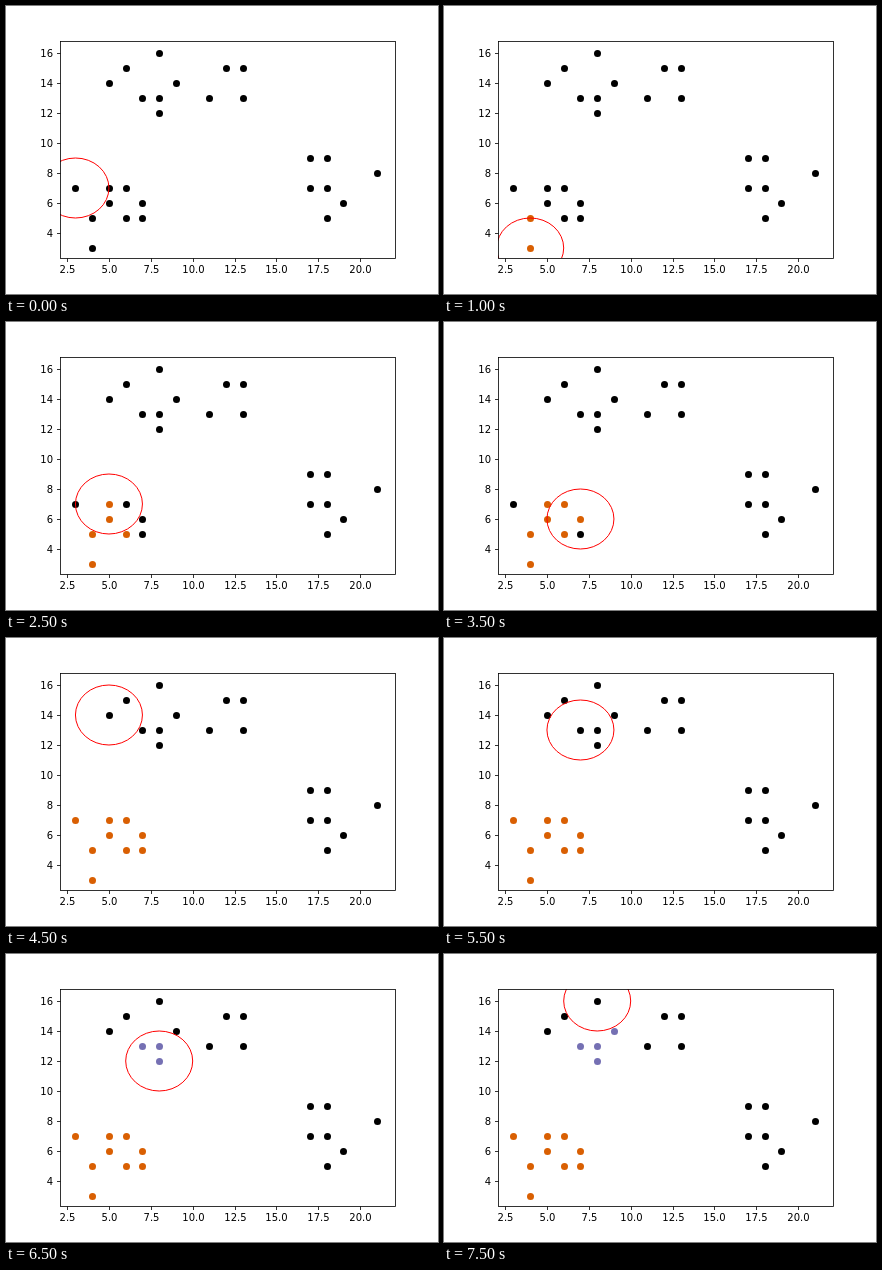
An HTML page for the animation above (8000 ms loop, 432 by 288 pixels).

```html
<!DOCTYPE html>
<html lang="en">
<head>
<meta charset="utf-8">
<title>Density clustering</title>
<style>
  html, body { margin: 0; width: 100%; height: 100%; overflow: hidden; background: #fff; }
  svg { display: block; width: 432px; height: 288px; }
  text { font: 10px "DejaVu Sans", sans-serif; fill: #000; }
  .axis { fill: none; stroke: #000; stroke-width: .8; }
  #scan { fill: none; stroke: #f00; stroke-width: 1; }
</style>
</head>
<body>
<svg viewBox="0 0 432 288">
  <clipPath id="plot"><rect x="54" y="35" width="335" height="217"/></clipPath>
  <g clip-path="url(#plot)">
    <g id="dots"></g>
    <ellipse id="scan" rx="33.5" ry="30"/>
  </g>
  <rect class="axis" x="54.5" y="35.5" width="335" height="217"/>
  <g id="ticks"></g>
</svg>
<script>
const STEP = 500;
const ORANGE = '#d95f02', PURPLE = '#7570b3', BLACK = '#000';

// Data units to pixels
const px = x => 19.2 + 16.75 * x;
const py = y => 287 - 15 * y;
const snap = v => Math.floor(v + .5) + .5;

// Points in the order they are scanned; a colour means the point joins that cluster
const visits = [
  [3, 7], [4, 5, ORANGE], [4, 3, ORANGE], [5, 6, ORANGE],
  [6, 5, ORANGE], [5, 7, ORANGE], [6, 7, ORANGE], [7, 6, ORANGE],
  [7, 5, ORANGE], [5, 14], [6, 15], [7, 13],
  [8, 13, PURPLE], [8, 12, PURPLE], [9, 14, PURPLE], [8, 16]
];
const unvisited = [
  [11, 13], [12, 15], [13, 13], [13, 15], [17, 7], [17, 9],
  [18, 5], [18, 7], [18, 9], [19, 6], [21, 8]
];

// Points first taken for noise that join a cluster later
const late = { '3,7': [9, ORANGE], '7,13': [13, PURPLE] };

const byId = id => document.getElementById(id);

function add(parent, tag, attrs, text = '') {
  const el = document.createElementNS('http://www.w3.org/2000/svg', tag);
  for (const key in attrs) el.setAttribute(key, attrs[key]);
  el.textContent = text;
  parent.append(el);
  return el;
}

const ticks = byId('ticks');
for (let v = 2.5; v <= 20; v += 2.5) {
  const x = snap(px(v));
  add(ticks, 'path', { class: 'axis', d: `M${x} 252.5v3.5` });
  add(ticks, 'text', { x, y: 267, 'text-anchor': 'middle' }, v.toFixed(1));
}
for (let v = 4; v <= 16; v += 2) {
  const y = snap(py(v));
  add(ticks, 'path', { class: 'axis', d: `M54.5 ${y}h-3.5` });
  add(ticks, 'text', { x: 47, y: y + 3.5, 'text-anchor': 'end' }, v);
}

const dots = [...visits, ...unvisited].map(([x, y, colour], i) => {
  const el = add(byId('dots'), 'circle', { cx: snap(px(x)), cy: snap(py(y)), r: 3.5 });
  const [from, fill] = late[[x, y]] || [i, colour || BLACK];
  return { el, from, fill };
});

const scan = byId('scan');
let shown = -1;

function show(step) {
  if (step === shown) return;
  shown = step;
  const [x, y] = visits[step];
  scan.setAttribute('cx', px(x));
  scan.setAttribute('cy', py(y));
  for (const { el, from, fill } of dots) el.setAttribute('fill', step >= from ? fill : BLACK);
}

const start = performance.now();
function tick() {
  show(Math.floor((performance.now() - start) / STEP) % visits.length);
  requestAnimationFrame(tick);
}
tick();
</script>
</body>
</html>
```
